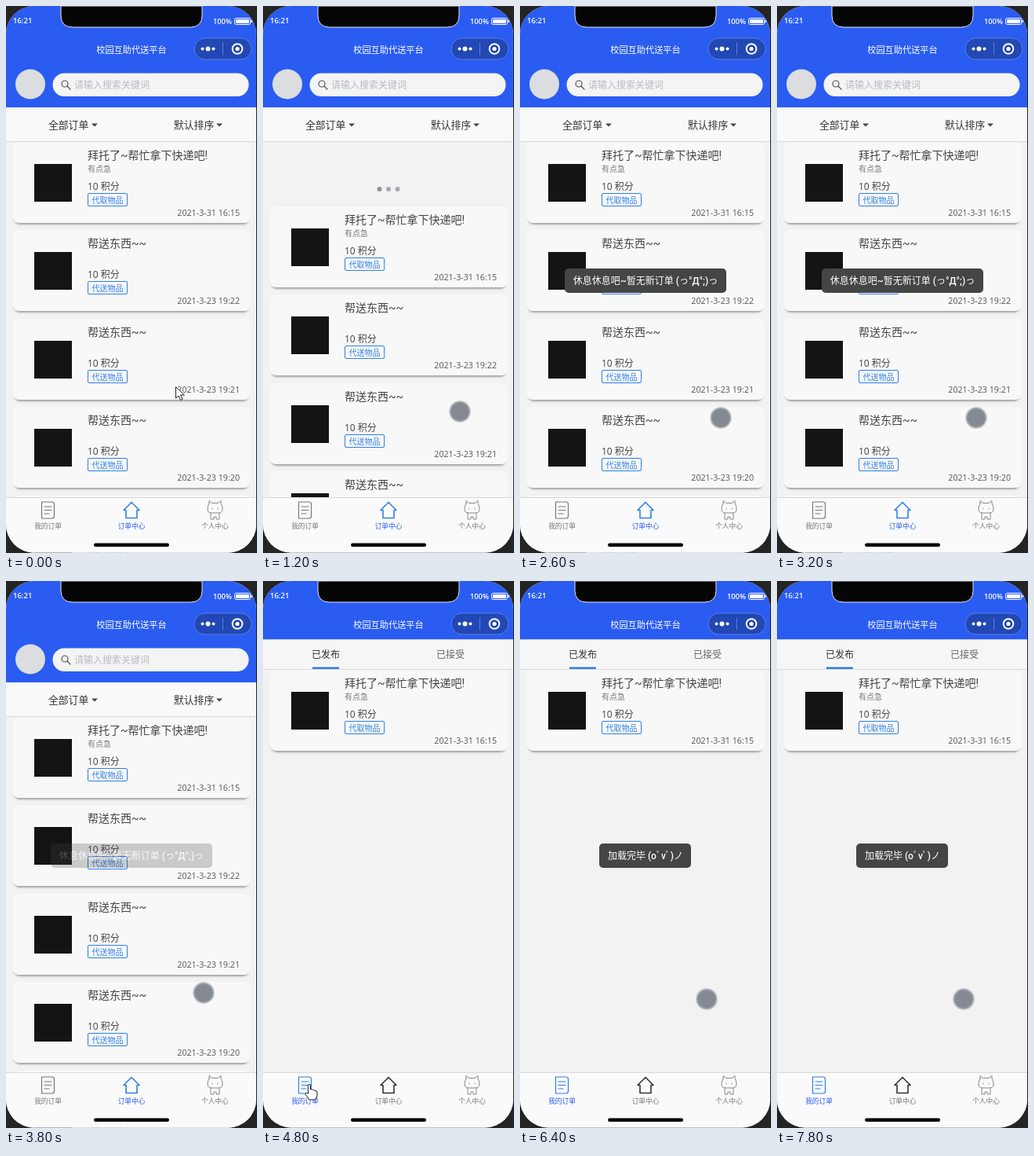
These frames come from a looping animation (320x696 px, 8000 ms). An HTML page:

```html
<!DOCTYPE html>
<html lang="zh-CN">
<head>
<meta charset="utf-8">
<title>校园互助代送平台</title>
<style>
  html, body { margin: 0; width: 100%; height: 100%; overflow: hidden; background: #242424; }
  svg { display: block; width: 100%; height: 100%; }
  text { font-family: "Open Sans", "Noto Sans CJK SC", "Noto Sans CJK", sans-serif; }
  .title { font-family: Roboto, "Noto Sans CJK SC", "Noto Sans CJK", sans-serif; }
  .strong { font-weight: 500; }
  .status { font-weight: 600; }
</style>
</head>
<body>
<svg id="stage" viewBox="0 0 320 696" xmlns="http://www.w3.org/2000/svg"></svg>
<script>
const LOOP = 8000, STEP = 200;
const BLUE = '#2a5cf1', LINK = '#2f80e8';
const stage = document.getElementById('stage');

const text = (x, y, size, fill, content, extra = '') =>
  `<text x="${x}" y="${y}" font-size="${size}" fill="${fill}" ${extra}>${content}</text>`;
const rect = (x, y, w, h, r, fill, extra = '') =>
  `<rect x="${x}" y="${y}" width="${w}" height="${h}" rx="${r}" fill="${fill}" ${extra}/>`;
const circle = (x, y, r, fill, extra = '') =>
  `<circle cx="${x}" cy="${y}" r="${r}" fill="${fill}" ${extra}/>`;
const path = (d, stroke, width = 1.2, fill = 'none') =>
  `<path d="${d}" fill="${fill}" stroke="${stroke}" stroke-width="${width}" stroke-linejoin="round" stroke-linecap="round"/>`;
const middle = 'text-anchor="middle"';

// Card coordinates are relative to the top of the list.
function card(top, title, note, tag, date) {
  return `<g transform="translate(0 ${top})">
    ${rect(10, 4, 300, 101, 8, '#a0a2a4', 'filter="url(#soft)"')}
    ${rect(8.5, 0, 303.5, 103, 8, '#f8f8f8')}
    ${rect(36, 28, 48, 48, 0, '#141414')}
    ${text(104, 21.5, 14, '#444', title, 'class="title"')}
    ${text(104, 38, 10, '#777', note)}
    ${text(104, 61, 12, '#444', '10 积分')}
    ${rect(104.5, 65.5, 50, 16, 1.5, 'none', `stroke="${LINK}"`)}
    ${text(109.5, 77.5, 10, LINK, tag)}
    ${text(298, 94, 10.7, '#555', date, 'text-anchor="end"')}
  </g>`;
}

const urgent = card(0, '拜托了~帮忙拿下快递吧!', '有点急', '代取物品', '2021-3-31 16:15');
const deliveries = ['19:22', '19:21', '19:20', '19:19'].map((time, i) =>
  card(Math.round(112.4 * (i + 1)), '帮送东西~~', '', '代送物品', '2021-3-23 ' + time)).join('');

const dots = (id, y) => `<g id="${id}">${[148.5, 160, 171.5].map(x => circle(x, y, 3, '#8e9299')).join('')}</g>`;
const arrow = x => `<path d="M${x} 149.5h8l-4 4z" fill="#444"/>`;

const centerPage = `<g id="center">
  ${dots('centerDots', 233)}
  <g id="centerList">${urgent + deliveries}</g>
  ${rect(0, 0, 320, 129, 0, BLUE)}
  ${circle(31, 99.5, 19, '#dcdde1')}
  ${rect(59.5, 85.5, 250, 29.5, 14.75, '#f4f4f5')}
  ${circle(75, 99, 4, 'none', 'stroke="#555" stroke-width="1.2"')}
  ${path('M78 102l4 4', '#555')}
  ${text(87, 104.5, 12, '#b9bbc0', '请输入搜索关键词')}
  ${rect(0, 129, 320, 43, 0, '#f9f9f9')}
  ${rect(0, 172, 320, 1, 0, '#d9d9d9')}
  ${text(54, 156, 12.8, '#333', '全部订单')}${arrow(109)}
  ${text(214, 156, 12.8, '#333', '默认排序')}${arrow(268)}
</g>`;

const minePage = `<g id="mine">
  ${dots('mineDots', 173)}
  <g id="mineList">${urgent}</g>
  ${rect(0, 0, 320, 74.5, 0, BLUE)}
  ${rect(0, 74.5, 320, 38, 0, '#f6f6f6')}
  ${rect(0, 112, 320, 1, 0, '#dadada')}
  ${text(80, 98, 12, '#333', '已发布', middle)}
  ${text(239, 98, 12, '#666', '已接受', middle)}
  ${rect(63, 109.5, 34, 2.5, 0, LINK)}
</g>`;

const topBar = `
  <path d="M70 0V12Q70 27 85 27H235Q250 27 250 12V0Z" fill="#050505" stroke="#dfe5f5"/>
  ${text(9, 22, 9.5, '#fff', '16:21', 'class="status"')}
  ${text(264, 23, 9.3, '#fff', '100%', 'class="status"')}
  ${rect(291.5, 15.5, 20, 8, 2, 'none', 'stroke="#fff"')}
  ${rect(293, 17, 17, 5, 1, '#fff')}${rect(312.5, 18, 1.5, 3, 0.5, '#fff')}
  ${text(160, 60, 11.2, '#fff', '校园互助代送平台', middle + ' class="strong"')}
  ${rect(240, 41, 73, 27, 13.5, '#2148b4', 'stroke="#5b7de0"')}
  ${circle(250.5, 54.5, 2, '#fff')}${circle(257.5, 54.5, 3, '#fff')}${circle(264.5, 54.5, 2, '#fff')}
  ${path('M276.5 47v15', '#5b7de0', 1)}
  ${circle(295, 54.5, 6.3, 'none', 'stroke="#fff" stroke-width="2"')}${circle(295, 54.5, 2.6, '#fff')}`;

function tabBar(id, active) {
  const icons = [
    c => path('M45.5 631h13q3 0 3 3v15q0 3-3 3h-13v-21zM49 637h9M49 641.5h9M49 646h6', c),
    c => path('M150 641.5L160 631.5L170 641.5H167V651.5H153V641.5Z', c, 1.6),
    c => path('M259 633V629.5L263 632.5H270L274 629.5V633Q276 636 276 640Q276 645 271 645H262Q257 645 257 640Q257 636 259 633ZM261 645V653H265V650H268V653H272V645M263 639v1M270 639v1', c, 1)
  ];
  const labels = ['我的订单', '订单中心', '个人中心'];
  const idle = ['#777', '#333', '#888'];
  return `<g id="${id}">${icons.map((icon, i) =>
    icon(i === active ? LINK : idle[i]) +
    text([53.5, 160, 266.5][i], 664.5, 8.7, i === active ? BLUE : '#777', labels[i], middle)).join('')}</g>`;
}

const toast = (id, x, w, message) => `<g id="${id}">
  ${rect(x, 334, w, 31, 5, '#444645')}
  ${text(160, 354, 12, '#fff', message, middle + ' class="title strong"')}</g>`;

stage.innerHTML = `
  <defs>
    <clipPath id="screen">${rect(0, 0, 319, 695.5, 36, '#fff')}</clipPath>
    <filter id="soft" x="-5%" y="-10%" width="110%" height="120%"><feGaussianBlur stdDeviation="1"/></filter>
    <radialGradient id="press">
      <stop offset="0.72" stop-color="#858992"/><stop offset="0.82" stop-color="#8f939b"/>
      <stop offset="1" stop-color="#b6b9bf" stop-opacity=".5"/>
    </radialGradient>
  </defs>
  ${rect(0, 0, 320, 696, 0, '#242424')}
  <g clip-path="url(#screen)">
    ${rect(0, 0, 320, 696, 0, '#f1f2f1')}
    ${centerPage}${minePage}${topBar}
    ${rect(0, 625.5, 320, 71, 0, '#fafafa')}${rect(0, 625, 320, 1, 0, '#d8d8d8')}
    ${tabBar('centerTabs', 1)}${tabBar('mineTabs', 0)}
    ${rect(112, 683.5, 96, 4.5, 2.25, '#050505')}
    ${toast('emptyToast', 57, 206, '休息休息吧~暂无新订单 (っ°Д°;)っ')}
    ${toast('doneToast', 101, 117, '加载完毕 (oﾟvﾟ)ノ')}
  </g>
  <g id="pointer">
    <g id="touch">${circle(0, 0, 14, 'url(#press)')}</g>
    <g id="cursor">${path('M0 0V14L3.5 11L6 16.5L8.5 15.5L6 10H10.5Z', '#222', 1, '#fff')}</g>
    <g id="hand">${path('M-1.5 0Q0-1.5 1.5 0V6Q3 5 4.5 6.5Q6 6 7 7.5Q10 7 10 10V14L8 19H0L-5 12Q-5 9-1.5 11Z', '#222', 1, '#fff')}</g>
  </g>`;

const el = {};
stage.querySelectorAll('g[id]').forEach(node => el[node.id] = node);

const pulls = [[600, 0], [1200, 82], [2200, 82], [2400, 0], [5400, 0], [5800, 82], [6200, 82], [6400, 0]];
const pointerPath = [
  [0, 216.5, 485], [600, 250, 434], [1200, 251, 516], [2600, 256, 524], [3800, 252, 524],
  [4000, 252, 524], [4600, 59, 641], [4900, 59, 641], [5400, 238, 450], [6000, 238, 532]
];

function track(keys, t, column = 1) {
  const next = keys.findIndex(key => key[0] > t);
  if (next < 0) return keys[keys.length - 1][column];
  if (next === 0) return keys[0][column];
  const a = keys[next - 1], b = keys[next];
  return a[column] + (b[column] - a[column]) * (t - a[0]) / (b[0] - a[0]);
}

const within = (t, from, to) => t >= from && t < to;
const show = (node, visible) => node.setAttribute('display', visible ? 'inline' : 'none');
const move = (node, x, y) => node.setAttribute('transform', `translate(${x} ${y})`);

function draw(time) {
  const t = Math.floor(time % LOOP / STEP) * STEP;
  const onMine = t >= 4800;
  show(el.center, !onMine);
  show(el.centerTabs, !onMine);
  show(el.mine, onMine);
  show(el.mineTabs, onMine);

  const pull = track(pulls, t);
  move(el.centerList, 0, 173 + pull);
  move(el.mineList, 0, 113 + pull);
  for (const group of [el.centerDots, el.mineDots]) {
    show(group, pull > 0);
    [...group.children].forEach((dot, i) =>
      dot.setAttribute('opacity', t / STEP % 3 === i ? 1 : 0.75));
  }

  show(el.emptyToast, within(t, 2400, 4000));
  el.emptyToast.setAttribute('opacity', t < 3800 ? 1 : 0.25);
  show(el.doneToast, t >= 6400);

  const pressed = within(t, 600, 4000) || t >= 5400;
  const pointing = within(t, 4600, 5000);
  show(el.touch, pressed);
  show(el.hand, pointing);
  show(el.cursor, !pressed && !pointing);
  move(el.pointer, track(pointerPath, t, 1), track(pointerPath, t, 2));
}

const start = performance.now();
function tick() {
  draw(performance.now() - start);
  requestAnimationFrame(tick);
}
tick();
</script>
</body>
</html>
```
